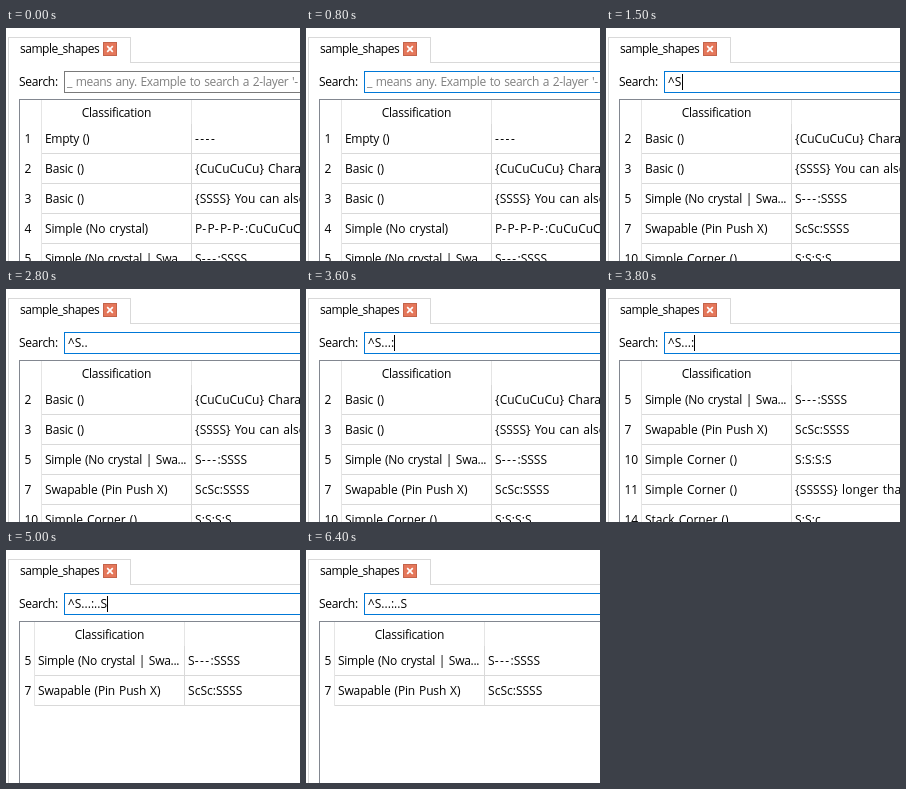
Animation, 294 px wide and 233 px high, one loop 6600 ms. Source, as an HTML page:

```html
<!DOCTYPE html>
<html lang="en">
<head>
<meta charset="utf-8">
<title>Shape table search</title>
<style>
  html, body { margin: 0; width: 100%; height: 100%; overflow: hidden; background: #fff; }
  svg { display: block; width: 100vw; height: 100vh; }
  text { font: 12px "Open Sans", "Noto Sans", sans-serif; fill: #000; white-space: pre; word-spacing: 1px; }
  rect, .line, .head, .frame { shape-rendering: crispEdges; }
  .line { fill: none; stroke: #d9d9d9; }
  .head { fill: none; stroke: #e5e5e5; }
  .frame { fill: none; stroke: #828790; }
  .hint { fill: #808080; letter-spacing: -.36px; }
  .dash { letter-spacing: 1.4px; }
  .hat { letter-spacing: .2px; }
</style>
</head>
<body>
<svg viewBox="0 0 294 233">
  <path class="line" d="M2.5 233V9.5H124.5V34.5H294"/>
  <text x="14" y="25" letter-spacing="-.5">sample_shapes</text>
  <rect x="97.5" y="14.5" width="13" height="13" fill="#e5775a" stroke="#c4644b"/>
  <path d="M101.2 18.2l5.6 5.6M106.8 18.2l-5.6 5.6" stroke="#fff" stroke-width="1.7"/>

  <text x="13" y="58" letter-spacing="-.3">Search:</text>
  <rect id="box" x="58.5" y="43.5" width="250" height="21" fill="#fff"/>
  <text id="hint" class="hint" x="61" y="58">_ means any. Example to search a 2-layer '-</text>
  <text id="query" x="62" y="58"></text>
  <rect id="caret" y="46" width="1" height="16"/>

  <g id="table"></g>
  <path class="frame" d="M13.5 233V71.5H294"/>
</svg>
<script>
const LOOP = 6600;
const $ = id => document.getElementById(id);

// number: [classification, shape code, letter spacing of each]
const SHAPES = {
  1: ["Empty ()", "----", -.3, 0],
  2: ["Basic ()", "{CuCuCuCu} Character", -.15, 0],
  3: ["Basic ()", "{SSSS} You can also", -.15, 0],
  4: ["Simple (No crystal)", "P-P-P-P-:CuCuCuCu", -.15, 0],
  5: ["Simple (No crystal | Swa...", "S---:SSSS", -.3, 0],
  7: ["Swapable (Pin Push X)", "ScSc:SSSS", -.15, 0],
  10: ["Simple Corner ()", "S:S:S:S", 0, .1],
  11: ["Simple Corner ()", "{SSSSS} longer than", 0, .1],
  14: ["Stack Corner ()", "S:S:c", 0, .1]
};

// start time, row numbers, width of the number column
const VIEWS = [
  [0, [1, 2, 3, 4, 5], 22],
  [1500, [2, 3, 5, 7, 10], 22],
  [3800, [5, 7, 10, 11, 14], 22],
  [5000, [5, 7], 15]
];

const QUERY = "^S...:..S";
const KEYS = [1100, 1300, 2000, 2200, 2900, 3600, 4500, 4600, 4900];
const CARET_X = [61, 69, 76, 79, 82, 85, 88, 91, 94, 101];
const CARET_ON = [[200, 800], [1100, 2800], [2900, 3400], [3600, 4200], [4500, 5500], [5900, 6400]];

const label = (x, y, s, gap = 0) =>
  `<text x="${x}" y="${y}" letter-spacing="${gap}">${s.replace(/-+/g, '<tspan class="dash">$&</tspan>')}</text>`;

function tableMarkup([, rows, numWidth]) {
  const x1 = 13.5 + numWidth, x2 = x1 + 150;
  const bottom = 96 + rows.length * 30;
  let grid = `M${x2} 96V${bottom}`;
  let out = label(x1 + 40.3, 89, "Classification", -.28);
  rows.forEach((n, i) => {
    const y = 115 + i * 30;
    const [kind, code, gapA, gapB] = SHAPES[n];
    grid += `M${x1 + .5} ${y + 10.5}H294`;
    out += label(18.6, y, String(n), -.3) + label(x1 + 3.5, y, kind, gapA) + label(x2 + 3.6, y, code, gapB);
  });
  return `<path class="head" d="M${x1} 72V${bottom}M${x2} 72V96"/><path class="line" d="${grid}"/>` + out;
}

const mix = (a, b, p) => a.map((v, i) => Math.round(v + (b[i] - v) * p));

let shownView, shownTyped;

function draw(t) {
  const view = VIEWS.filter(v => v[0] <= t).pop();
  if (view !== shownView) {
    $("table").innerHTML = tableMarkup(view);
    shownView = view;
  }

  const typed = KEYS.filter(k => k <= t).length;
  if (typed !== shownTyped) {
    $("query").innerHTML = QUERY.slice(0, typed).replace("^", '<tspan class="hat">^</tspan>');
    $("hint").style.display = typed ? "none" : "";
    $("caret").setAttribute("x", CARET_X[typed]);
    shownTyped = typed;
  }

  const blink = CARET_ON.some(([a, b]) => t >= a && t < b);
  $("caret").style.display = blink ? "" : "none";

  const focus = Math.min(Math.floor(t / 100) / 3, 1);
  $("box").setAttribute("stroke", `rgb(${mix([122, 122, 122], [0, 120, 215], focus)})`);
}

const start = performance.now();
function tick() {
  draw((performance.now() - start) % LOOP);
  requestAnimationFrame(tick);
}
tick();
</script>
</body>
</html>
```
